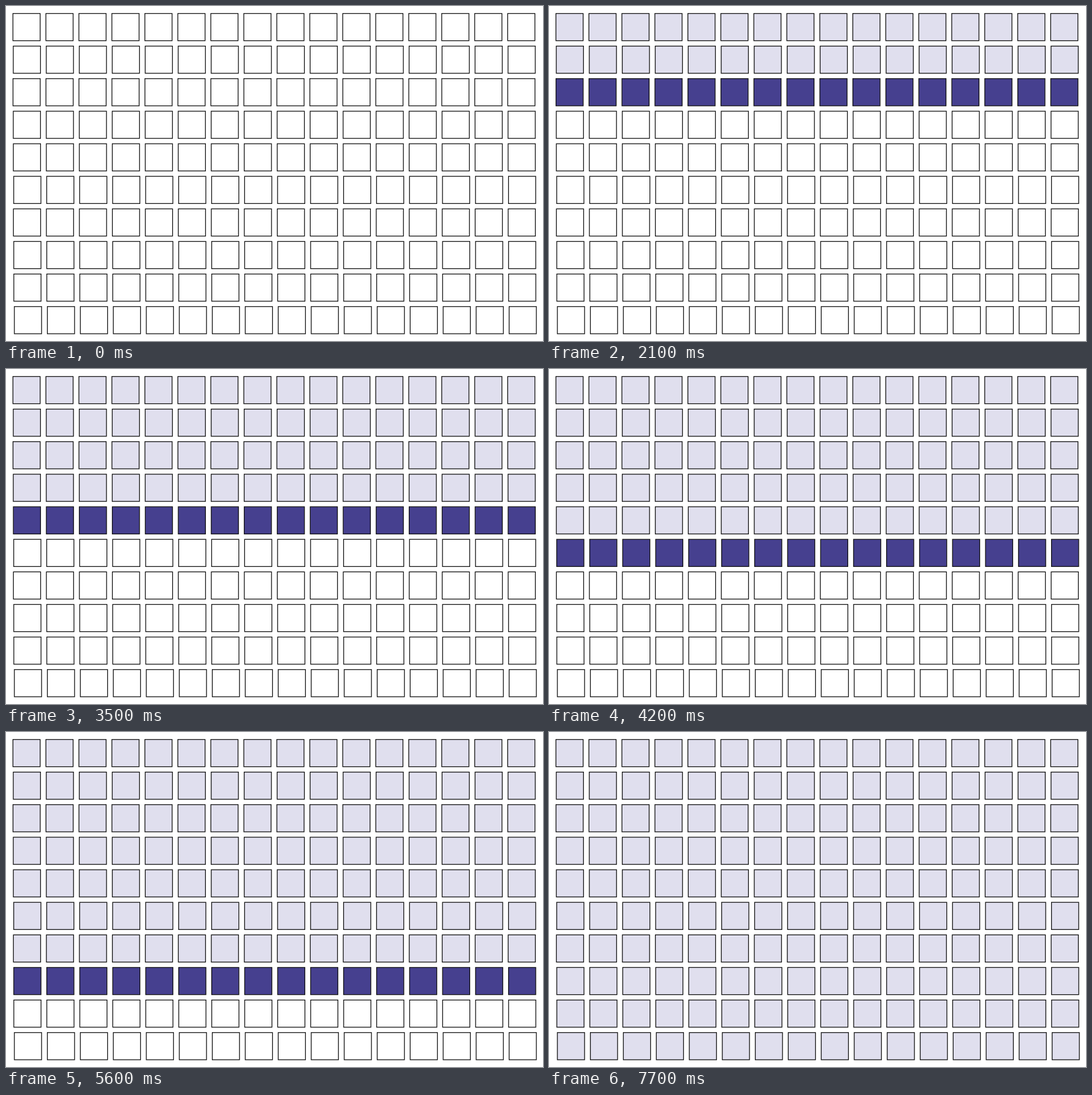
These frames come from a looping animation (892x557 px, 8.4 s). An HTML page:

```html
<!DOCTYPE html>
<html lang="en">
<head>
<meta charset="utf-8">
<title>Row by row</title>
<style>
html, body { margin: 0; width: 100%; height: 100%; overflow: hidden; background: #fff; }
svg { display: block; width: 892px; height: 557px; }
rect { stroke: #111; stroke-width: 1.3; }
</style>
</head>
<body>
<svg id="stage" viewBox="0 0 892 557"></svg>
<script>
const NS = "http://www.w3.org/2000/svg";
const STEP = 700, STEPS = 12, COLS = 16;
const EMPTY = "#ffffff", ACTIVE = "#46408f", DONE = "#e0dfee";
// left edge of each row, slightly uneven
const LEFT = [11.5, 12.1, 11.6, 12.1, 12.2, 12.8, 12.3, 12.9, 13, 13.9];
const PITCH_X = 54.79, PITCH_Y = 54.14, TOP = 12.5, SIZE = 45.2;

const stage = document.getElementById("stage");
const rows = LEFT.map((left, r) => {
  const g = document.createElementNS(NS, "g");
  for (let c = 0; c < COLS; c++) {
    const box = document.createElementNS(NS, "rect");
    box.setAttribute("x", (left + c * PITCH_X).toFixed(2));
    box.setAttribute("y", (TOP + r * PITCH_Y).toFixed(2));
    box.setAttribute("width", SIZE);
    box.setAttribute("height", SIZE);
    g.appendChild(box);
  }
  stage.appendChild(g);
  return g;
});

let shown = -1;
function draw(time) {
  const step = Math.floor(time / STEP) % STEPS;
  if (step === shown) return;
  shown = step;
  rows.forEach((row, r) => {
    const active = step - 1;
    row.setAttribute("fill", r < active ? DONE : r === active ? ACTIVE : EMPTY);
  });
}

const start = performance.now();
function tick() {
  draw(performance.now() - start);
  requestAnimationFrame(tick);
}
tick();
</script>
</body>
</html>
```
